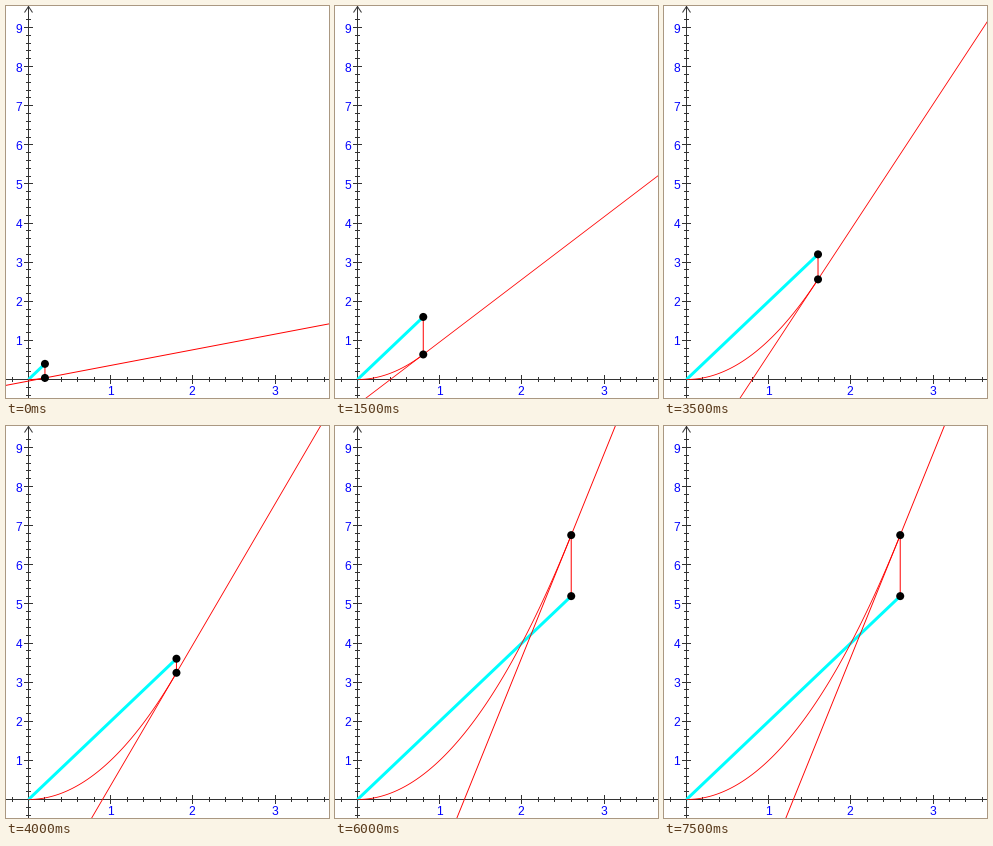
Animation of 323 by 392 pixels, one loop 8000 ms. Source, as a matplotlib script:

```python
import numpy as np
import matplotlib.pyplot as plt
from matplotlib.animation import FuncAnimation
from matplotlib.patches import Circle

W, H, DPI = 323, 392, 100
PT = 72 / DPI                 # points per pixel
OX, OY = 22.5, 373.5          # origin on the stage
UX, UY = 82.2, 39.11          # pixels per unit
STEP_MS, STEPS = 500, 16
AXIS = "#333333"

fig = plt.figure(figsize=(W / DPI + 1e-6, H / DPI + 1e-6), dpi=DPI, facecolor="white")
ax = fig.add_axes([0, 0, 1, 1])
ax.set_xlim(0, W)
ax.set_ylim(H, 0)
ax.axis("off")


def to_px(x, y):
    return OX + UX * np.asarray(x), OY - UY * np.asarray(y)


def stroke(xs, ys, color=AXIS, width=1.0, z=1):
    line, = ax.plot(xs, ys, color=color, lw=width * PT, zorder=z,
                    snap=False, solid_capstyle="butt")
    return line


def label(x, y, text, ha):
    ax.text(x, y, text, color="blue", ha=ha, va="center_baseline",
            family="Liberation Sans", fontsize=12 * PT, zorder=1)


def tick_size(i):
    return 4.5 if i % 5 == 0 else 2.5


def draw_axes():
    stroke([0, W], [OY, OY])
    stroke([OX, OX], [0, H])
    stroke([OX - 4, OX, OX + 4], [6.5, 0.5, 6.5])
    for i in range(-1, 19):
        if i:
            x, size = np.floor(OX + UX * i / 5) + 0.5, tick_size(i)
            stroke([x, x], [OY - size, OY + size])
    for i in range(-2, 47):
        if i:
            y, size = np.floor(OY - UY * i / 5) + 0.5, tick_size(i)
            stroke([OX - size, OX + size], [y, y])
    for n in range(1, 4):
        label(OX + UX * n - 0.7, 384.5, str(n), "center")
    for n in range(1, 10):
        label(15.9, OY - UY * n + 0.5, str(n), "right")


draw_axes()
chord = stroke([], [], "cyan", 3, z=3)
curve = stroke([], [], "red", 0.85, z=4)
tangent = stroke([], [], "red", z=4)
gap = stroke([], [], "red", z=4)
dots = [ax.add_patch(Circle((0, 0), 4, fc="black", lw=0, zorder=5, snap=False))
        for _ in range(2)]


def position(step):
    """Climb to 2.8, rest one step, then turn back."""
    if step <= 13:
        return 0.2 * (step + 1)
    return 2.8 if step == 14 else 2.6


def thin_width(xs, ys):
    """Width of a line that is one pixel thick along its minor axis."""
    dx, dy = abs(xs[1] - xs[0]), abs(ys[1] - ys[0])
    return max(dx, dy) / np.hypot(dx, dy)


def update(step):
    a = position(step)
    chord.set_data(*to_px([0, a], [0, 2 * a]))
    t = np.linspace(0, a, 120)
    curve.set_data(*to_px(t, t * t))
    ends = np.array([-1.0, 5.0])
    xs, ys = to_px(ends, 2 * a * ends - a * a)
    tangent.set_data(xs, ys)
    tangent.set_linewidth(thin_width(xs, ys) * PT)
    xs, ys = to_px([a, a], [a * a, 2 * a])
    gap.set_data(xs, ys)
    for dot, x, y in zip(dots, xs, ys):
        dot.center = x, y
    return chord, curve, tangent, gap, *dots


anim = FuncAnimation(fig, update, frames=STEPS, interval=STEP_MS,
                     repeat=True, repeat_delay=0, blit=False)
plt.show()
```
